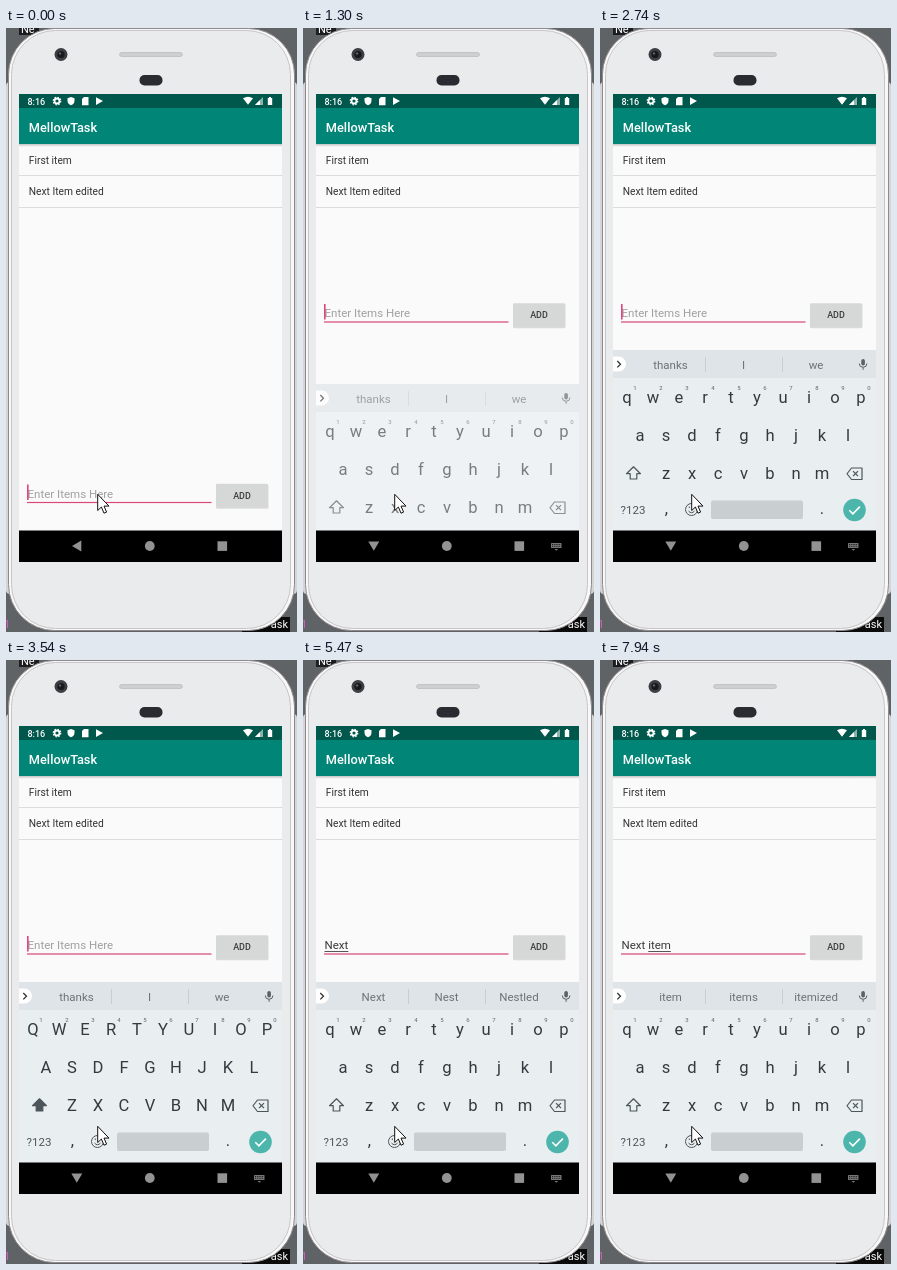
Recreate the animation shown at these times as an HTML page. Size 291 px wide and 604 px high, loop 8000 ms.

```html
<!DOCTYPE html>
<html lang="en">
<head>
<meta charset="utf-8">
<title>To-do entry</title>
<style>
  html, body { margin: 0; width: 100%; height: 100%; overflow: hidden; background: #606365; }
  svg { display: block; width: 291px; height: 604px; }
  text { font-family: Roboto, sans-serif; white-space: pre; }
  .mid { text-anchor: middle; }
  .row { font-size: 10.24px; fill: #333; }
  .field { font-size: 11.52px; }
  .word { font-size: 11.5px; fill: #6c7276; }
  .key { font-size: 16.6px; fill: #343b40; }
  .digit { font-size: 6px; fill: #5c6468; }
</style>
</head>
<body>
<svg viewBox="0 0 291 604">
  <defs>
    <linearGradient id="shade" x2="0" y2="1">
      <stop stop-color="#000" stop-opacity=".22"/>
      <stop offset="1" stop-color="#000" stop-opacity="0"/>
    </linearGradient>
    <clipPath id="screen"><rect x="13" y="66" width="263" height="437"/></clipPath>
  </defs>

  <!-- desktop behind the phone -->
  <rect width="291" height="604" fill="#606365"/>
  <rect x="13" width="20" height="7" fill="#1c1d1e"/>
  <text x="15" y="5" font-size="11" fill="#fff">Ne</text>
  <rect x="236" y="589" width="48" height="15" fill="#0b0b0c"/>
  <text x="282" y="600" font-size="11" fill="#fff" text-anchor="end">ask</text>
  <text x="-2" y="600" font-size="11" fill="#d45fc0">1</text>

  <!-- phone body -->
  <rect y="54" width="291" height="512" rx="4" fill="#d6d4d5"/>
  <rect x="2.5" y=".5" width="286" height="602" rx="46" fill="#f8f8f8" stroke="#8e898c"/>
  <rect x="5.5" y="2.5" width="279" height="598" rx="44" fill="#e9ebec" stroke="#c9c5c7"/>
  <circle cx="55" cy="26.5" r="6.5" fill="#3c3e41"/>
  <circle cx="55" cy="26.5" r="3.6" fill="#17181b"/>
  <circle cx="54" cy="25.5" r="1.2" fill="#596069"/>
  <rect x="113.5" y="24.5" width="63" height="4" rx="2" fill="#cdcfd0" stroke="#b9bbbc" stroke-width=".7"/>
  <rect x="133.5" y="47" width="23" height="10.500" rx="5" fill="#292b30"/>

  <!-- app -->
  <rect x="13" y="66" width="263" height="468" fill="#fafafa"/>
  <rect x="13" y="116" width="263" height="3" fill="url(#shade)"/>
  <rect x="13" y="66" width="263" height="14" fill="#00574b"/>
  <rect x="13" y="80" width="263" height="36" fill="#008577"/>
  <text x="21.500" y="76.500" font-size="9" font-weight="500" fill="#fff">8:16</text>
  <g fill="#fff">
    <circle cx="51" cy="73" r="2.500" fill="none" stroke="#fff" stroke-width="1.800"/>
    <circle cx="51" cy="73" r="3.800" fill="none" stroke="#fff" stroke-width="1.200" stroke-dasharray="1.5 1.48"/>
    <path d="M65 69l3.500 1.300v2.500q0 3-3.500 4.500-3.500-1.500-3.500-4.500v-2.500z"/>
    <path d="M78 69h4.500v8.200h-6.500v-6.200z"/>
    <path d="M90 69.300l7 3.700-7 3.900z"/>
    <path d="M237 70.300q5-3 10 0l-5 6.500z"/>
    <path d="M257 69v8h-8z" opacity=".55"/>
    <path d="M254 72v5h-5z"/>
    <path d="M261.800 70h1.200v-1h2v1h1.200v7h-4.400z"/>
  </g>
  <text x="22.800" y="103.500" font-size="12.800" font-weight="500" fill="#fff">MellowTask</text>
  <text class="row" x="22.800" y="135.700">First item</text>
  <text class="row" x="22.800" y="167.300">Next Item edited</text>
  <path d="M13 147.500h263M13 179.500h263" stroke="#dcdcdc"/>

  <!-- entry line -->
  <g id="entry">
    <text id="hint" class="field" x="21.500" y="289" fill="#a0a0a0">Enter Items Here</text>
    <text id="typed" class="field" x="21.500" y="289" fill="#3a3a3a"></text>
    <rect id="compose" y="291" height=".9" fill="#444"/>
    <rect x="21" y="293.400" width="184.500" height="1.200" fill="#d8487a"/>
    <rect id="caret" y="276" width="1.300" height="15.500" fill="#d81b60"/>
    <rect x="210" y="276" width="52.500" height="24.300" rx="1.500" fill="#000" opacity=".13"/>
    <rect x="210" y="275.300" width="52" height="23.500" rx="1.300" fill="#d6d7d7"/>
    <text class="mid" x="236" y="290.300" font-size="8.960" font-weight="500" fill="#3b3b3b">ADD</text>
  </g>

  <g clip-path="url(#screen)"><g id="board">
    <rect x="13" y="322" width="263" height="181" fill="#e9eef1"/>
    <rect x="13" y="322" width="263" height="28" fill="#dfe4e8"/>
    <path d="M105.500 329v15M182.500 329v15" stroke="#c8ced2"/>
    <path d="M13 328.500h5.500a7.500 7.500 0 0 1 0 15h-5.500z" fill="#fff"/>
    <path d="M17.300 333l3.200 3.200-3.200 3.200" fill="none" stroke="#333" stroke-width="1.300"/>
    <rect x="261.300" y="331" width="3.600" height="6.500" rx="1.800" fill="#596166"/>
    <path d="M259.300 335.500a3.800 3.800 0 0 0 7.600 0M263.100 339.500v2.300" fill="none" stroke="#596166"/>
    <g id="words"></g>
    <g id="keys"></g>
    <path id="shift" d="M33.500 438.800l7 6.900h-3.700v5.300h-6.600v-5.300h-3.700z" stroke="#4d565b" stroke-width="1.200" stroke-linejoin="round"/>
    <path d="M251.500 440h10.500v11.500h-10.500l-4.500-5.750z" fill="none" stroke="#4d565b" stroke-width="1.200" stroke-linejoin="round"/>
    <path d="M253 443.200l5 5m0-5l-5 5" stroke="#4d565b" stroke-width="1.200"/>
    <text class="mid" x="33" y="486" font-size="11.500" fill="#4d565b">?123</text>
    <text class="key mid" x="66.500" y="486">,</text>
    <text class="key mid" x="222" y="486">.</text>
    <g fill="none" stroke="#4d565b">
      <circle cx="91.500" cy="481.500" r="6"/>
      <path d="M88.500 483q3 3.500 6 0M89.300 478.500v1.600M93.700 478.500v1.600"/>
    </g>
    <rect x="111" y="472.500" width="92" height="18.500" rx="2" fill="#c9ced1"/>
    <circle cx="254.500" cy="482" r="11.300" fill="#4db6ac"/>
    <path d="M249.300 482.200l3.600 3.600 7-7.200" fill="none" stroke="#fff" stroke-width="1.600"/>
  </g></g>

  <!-- navigation bar -->
  <rect x="13" y="502.500" width="263" height="31.500" fill="#000"/>
  <g fill="#929292">
    <path id="back" d="M66 518l9.300-5.500v11z"/>
    <circle cx="143.800" cy="518" r="4.900"/>
    <rect x="211.500" y="513.300" width="9.600" height="9.600"/>
    <g id="switch">
      <rect x="248" y="515" width="10.500" height="5" rx=".6" fill="#777"/>
      <path d="M249 516.500h8.500M249 518.300h8.500" stroke="#000" stroke-width=".8" stroke-dasharray="1 .8"/>
      <path d="M251.500 521h3.600l-1.800 1.700z" fill="#777"/>
    </g>
  </g>

  <path d="M91.700 466.300v16.200l3.700-3.500 2.600 6.200 2.600-1.100-2.600-6h5z" fill="#fff" stroke="#111" stroke-width="1" stroke-linejoin="round"/>
</svg>

<script>
const LOOP = 8000;
const FIELD_X = 21.5;
const $ = id => document.getElementById(id);

// Each step lists only what changes at that time.
const steps = [
  [0, { text: '', from: 0, caret: 1, lift: 0, slide: 181, fade: 0, turn: 0, caps: 0, words: 'thanks I we' }],
  [610, { caret: 0 }],
  [1020, { caret: 1, lift: 1, turn: -45 }],
  [1170, { turn: -90 }],
  [1300, { slide: 34, fade: .65 }],
  [1420, { slide: 0, fade: 1 }],
  [2150, { caret: 0 }],
  [2740, { caret: 1 }],
  [3160, { caret: 0 }],
  [3540, { caret: 1, caps: 1 }],
  [3690, { text: 'N', caps: 0, words: 'N No Not' }],
  [3990, { caret: 0 }],
  [4370, { text: 'Ne', caret: 1 }],
  [4510, { words: 'Ne Need Next' }],
  [4780, { text: 'Nex' }],
  [4930, { text: 'Next' }],
  [5070, { words: 'Next Nest Nestled' }],
  [5470, { caret: 0 }],
  [5880, { text: 'Next ', from: 5, caret: 1 }],
  [6030, { words: 'time one is' }],
  [6300, { text: 'Next i', words: 'i I it' }],
  [6550, { text: 'Next it' }],
  [6700, { words: 'it its is' }],
  [7110, { text: 'Next ite' }],
  [7260, { text: 'Next item' }],
  [7410, { words: 'item items itemized' }],
  [7940, { caret: 0 }]
];

let state = {};
const states = steps.map(([, change]) => state = { ...state, ...change });

function label(parent, cls, x, y, text = '') {
  const el = document.createElementNS('http://www.w3.org/2000/svg', 'text');
  el.setAttribute('class', cls + ' mid');
  el.setAttribute('x', x);
  el.setAttribute('y', y);
  el.textContent = text;
  return parent.appendChild(el);
}

const rows = [['qwertyuiop', 27, 375], ['asdfghjkl', 40, 412.7], ['zxcvbnm', 66, 450.5]];
const keys = rows.flatMap(([letters, x, y]) =>
  [...letters].map((c, i) => label($('keys'), 'key', x + i * 26, y, c)));
for (let i = 0; i < 10; i++) label($('keys'), 'digit', 35 + i * 26, 361.5, (i + 1) % 10);
const words = [70.5, 143.5, 216].map(x => label($('words'), 'word', x, 341));

function textWidth(text) {
  $('typed').textContent = text;
  return text ? $('typed').getComputedTextLength() : 0;
}

function show(s) {
  const start = textWidth(s.text.slice(0, s.from));
  const end = textWidth(s.text);
  $('hint').style.display = s.text ? 'none' : '';
  $('compose').setAttribute('x', FIELD_X + start);
  $('compose').setAttribute('width', Math.max(0, end - start));
  $('caret').setAttribute('x', s.text ? FIELD_X + end - .4 : 21.2);
  $('caret').style.display = s.caret ? '' : 'none';
  $('entry').setAttribute('transform', `translate(0 ${s.lift ? 0 : 180.5})`);
  $('board').setAttribute('transform', `translate(0 ${s.slide})`);
  $('board').setAttribute('opacity', s.fade);
  $('back').setAttribute('transform', `rotate(${s.turn} 70.8 518)`);
  $('switch').style.display = s.lift ? '' : 'none';
  $('shift').setAttribute('fill', s.caps ? '#4d565b' : 'none');
  keys.forEach(k => {
    k.textContent = s.caps ? k.textContent.toUpperCase() : k.textContent.toLowerCase();
  });
  s.words.split(' ').forEach((w, i) => words[i].textContent = w);
}

let current = -1;
const origin = performance.now();

function tick() {
  const t = (performance.now() - origin) % LOOP;
  let i = steps.length - 1;
  while (steps[i][0] > t) i--;
  if (i !== current) show(states[current = i]);
  requestAnimationFrame(tick);
}
tick();
</script>
</body>
</html>
```
